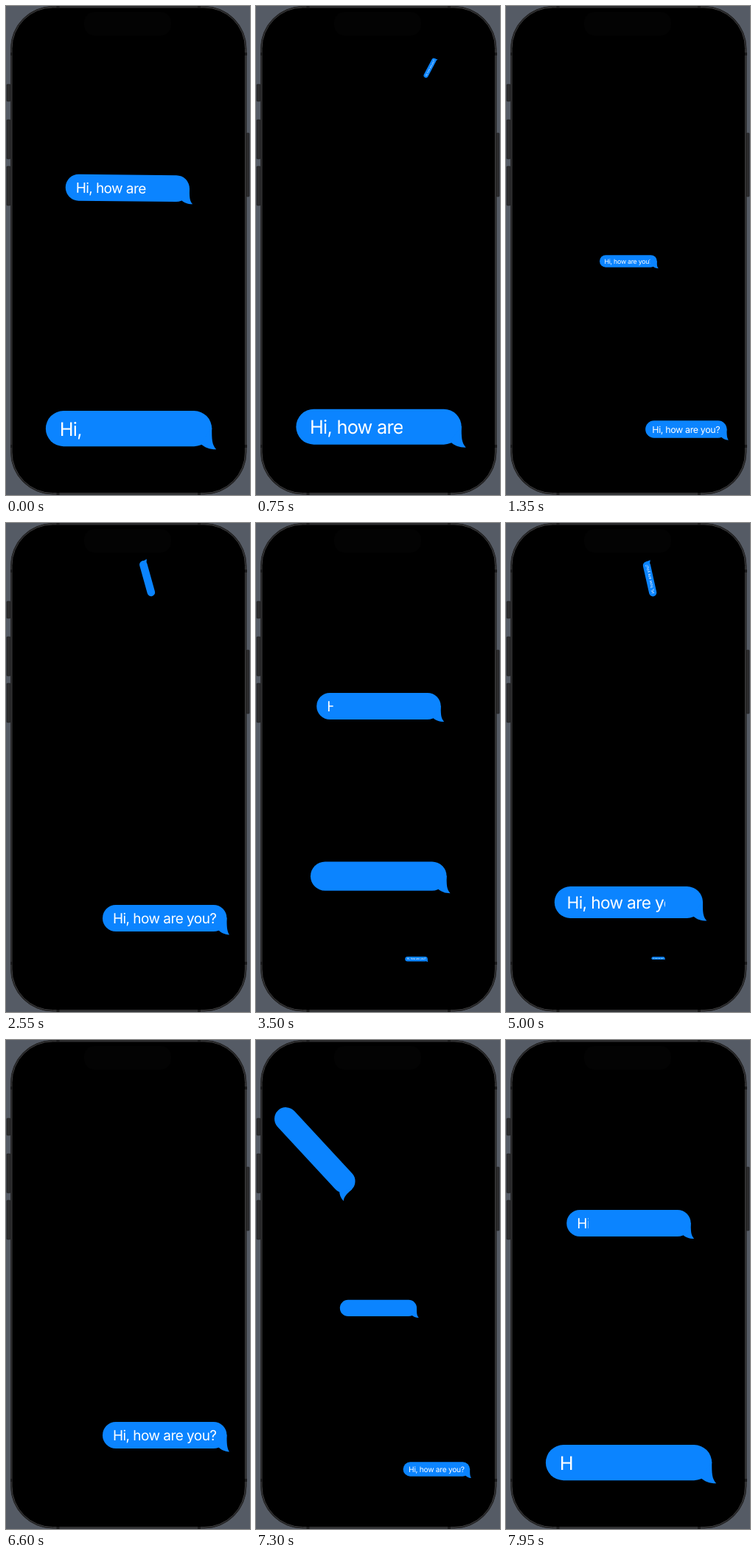
Write an HTML page that moves like this. It is 331x662 px and loops after 8 s.

```html
<!DOCTYPE html>
<html lang="en">
<head>
<meta charset="utf-8">
<title>Message bubbles</title>
<style>
  html, body { margin: 0; width: 100%; height: 100%; overflow: hidden; background: #555b65; }
  svg { display: block; width: 100vw; height: 100vh; }
  text { font: 400 19px Inter, "Open Sans", sans-serif; letter-spacing: -.55px; fill: #fff; text-rendering: geometricPrecision; }
</style>
</head>
<body>
<svg id="stage" viewBox="0 0 331 662">
  <rect width="331" height="662" fill="#555b65"/>
  <g fill="#2c2c2e" stroke="#1c1c1e" stroke-width=".6">
    <rect x="1" y="106" width="5" height="23" rx="1"/>
    <rect x="1" y="154" width="5" height="53" rx="1"/>
    <rect x="1" y="217" width="5" height="53" rx="1"/>
    <rect x="326" y="172" width="4" height="86" rx="1"/>
  </g>
  <rect x="6.5" y=".5" width="319.5" height="660.5" rx="57" fill="#1a1a1b" stroke="#2a2a2b"/>
  <rect x="8" y="2" width="316.5" height="657.500" rx="55.500" fill="#000" stroke="#404042"/>
  <rect x="106" y="8" width="118" height="32" rx="14" fill="#030303"/>
  <path d="M6 65h3M324 65h3M6 596h3M324 596h3M70.500 0v3M262 0v3M70.500 659v3M262 659v3" stroke="#1b1b1c" stroke-width="4"/>
</svg>
<script>
const LOOP = 8000, MOVE = 1100, TEXT_X = 14, TEXT_WIDTH = 140;
const NS = 'http://www.w3.org/2000/svg';
const stage = document.getElementById('stage');
const mod = (a, n) => ((a % n) + n) % n;

function add(parent, tag, attrs) {
  const node = document.createElementNS(NS, tag);
  for (const key in attrs) node.setAttribute(key, attrs[key]);
  return parent.appendChild(node);
}

// cubic-bezier(.42, 0, .58, 1), solved by bisection
function ease(x) {
  if (x <= 0) return 0;
  if (x >= 1) return 1;
  let low = 0, high = 1;
  for (let i = 0; i < 24; i++) {
    const k = (low + high) / 2, r = 1 - k;
    if (3 * r * r * k * .42 + 3 * r * k * k * .58 + k ** 3 < x) low = k; else high = k;
  }
  return low * low * (3 - 2 * low);
}

function bezier(points, u) {
  while (points.length > 1)
    points = points.slice(1).map((p, i) => p.map((v, a) => points[i][a] + (v - points[i][a]) * u));
  return points[0];
}

const LEFT_TAIL = 'M168.500 17C168.500 29 168.500 34 173 39C166 39 161 37 157 33Z';
const DEEP_TAIL = 'M168.500 17C168.500 29 168.500 35 172 40.500C165 40 160 37.500 156 33Z';

function makeBubble(id, { path, size, spin = 0, tail = LEFT_TAIL }) {
  const group = add(stage, 'g', {});
  add(group, 'rect', { width: 168.5, height: 36, rx: 18, fill: '#0b84ff' });
  add(group, 'path', { d: tail, fill: '#0b84ff' });
  const clip = add(add(group, 'clipPath', { id }), 'rect', { x: TEXT_X, y: 0, height: 36 });
  add(add(group, 'g', { 'clip-path': `url(#${id})` }), 'text', { x: TEXT_X, y: 25.2 })
    .textContent = 'Hi, how are you?';
  // u: place along the path, from vanished (0) to full size (1)
  return (u, shown) => {
    group.setAttribute('visibility', u < .03 ? 'hidden' : 'visible');
    const [x, y] = bezier(path, u);
    group.setAttribute('transform',
      `translate(${x} ${y}) rotate(${spin * (1 - u)}) scale(${size * u}) translate(-86.3 -20)`);
    clip.setAttribute('width', shown < 1 ? TEXT_WIDTH * shown : 154);
  };
}

const spinner = makeBubble('spinner', {
  path: [[260, 82], [280, 114], [-148, -60], [168.5, 250]], size: 1, spin: 360
});
const composer = makeBubble('composer', {
  path: [[166, 353], [167, 280], [169.3, 574.8]], size: 1.337
});
const sent = makeBubble('sent', {
  path: [[187, 586], [288, 606.6], [217.3, 537]], size: 1, tail: DEEP_TAIL
});

// Each cycle leaves at its start, comes back at half time, then types its text.
function cycle(t, { period, start, typeAt, typeTime }) {
  const time = mod(t - start, period), back = period / 2;
  const age = mod(time - typeAt, period);
  return {
    place: time < back ? 1 - ease(time / MOVE) : ease((time - back) / MOVE),
    shown: time >= back && time < typeAt ? 0 : ease(age / typeTime)
  };
}

const SPINNER = { period: 4340, start: 4308, typeAt: 3205, typeTime: 1900 };
const COMPOSER = { period: 4050, start: 700, typeAt: 2670, typeTime: 2370 };

function draw(now) {
  const t = now % LOOP;
  const a = cycle(t, SPINNER), b = cycle(t, COMPOSER);
  spinner(a.place, a.shown);
  composer(b.place, b.shown);
  sent(1 - b.place, 1);
  requestAnimationFrame(draw);
}
draw(performance.now());
</script>
</body>
</html>
```
